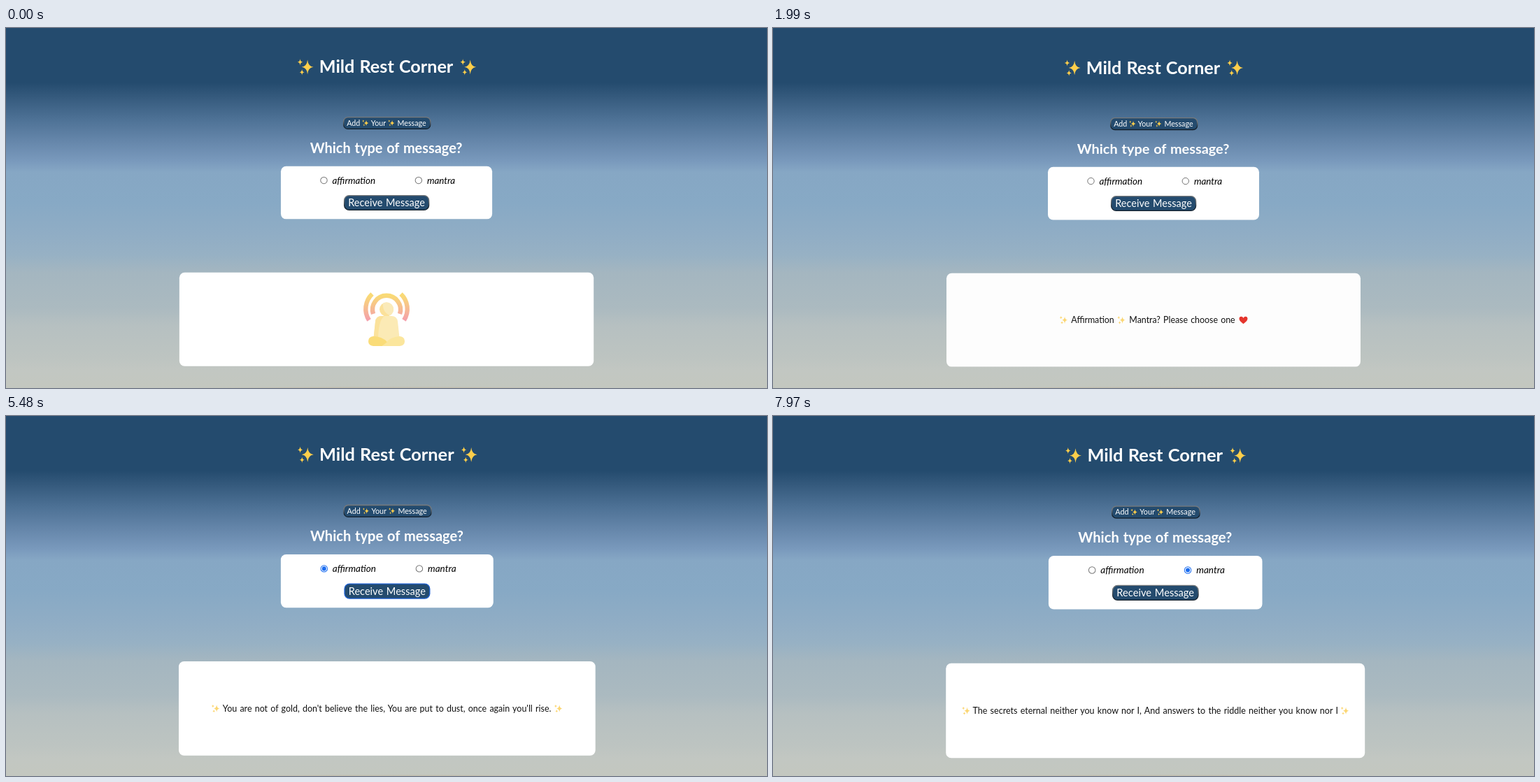
Animation of 1088 by 515 pixels, one loop 8000 ms. Source, as an HTML page:

```html
<!DOCTYPE html>
<html lang="en">
<head>
<meta charset="utf-8">
<title>Message picker</title>
<style>
  html, body { margin: 0; height: 100%; overflow: hidden; }
  svg { display: block; width: 100vw; height: 100vh; }
  text { font-family: Lato, "Open Sans", sans-serif; text-anchor: middle; word-spacing: 1px; }
  .light { fill: #fff; }
  .title { font-size: 25.2px; font-weight: 700; }
  .ask { font-size: 19.9px; font-weight: 700; }
  .small { font-size: 10.7px; }
  .send { font-size: 14.5px; }
  .label { font-size: 13.4px; font-style: italic; }
  .message { font-size: 12.4px; fill: #111; }
  .button { fill: #244b6e; stroke-width: 1.3; }
</style>
</head>
<body>
<svg viewBox="0 0 1088 515" preserveAspectRatio="none">
  <defs>
    <linearGradient id="sky" gradientUnits="userSpaceOnUse" x1="0" y1="0" x2="0" y2="515"></linearGradient>
    <linearGradient id="edge" x1="0" y1="0" x2="0" y2="1">
      <stop offset=".3" stop-color="#77797a"/>
      <stop offset=".8" stop-color="#14202b"/>
    </linearGradient>
    <linearGradient id="aura" gradientUnits="userSpaceOnUse" x1="0" y1="380" x2="0" y2="421">
      <stop offset=".1" stop-color="#f9da76"/>
      <stop offset=".95" stop-color="#f49fab"/>
    </linearGradient>
    <radialGradient id="hint">
      <stop offset=".6" stop-color="#bda98c" stop-opacity=".35"/>
      <stop offset="1" stop-color="#bda98c" stop-opacity="0"/>
    </radialGradient>
    <path id="star" d="M0-1Q.1-.1 1 0Q.1.1 0 1Q-.1.1-1 0Q-.1-.1 0-1Z"/>
    <g id="sparkles">
      <use href="#star" transform="translate(.13 0) scale(.35 .43)"/>
      <use href="#star" transform="translate(-.31 -.29) scale(.16 .19)"/>
      <use href="#star" transform="translate(-.2 .31) scale(.15 .18)"/>
    </g>
    <path id="heart" fill="#e5352d" d="M0 .45C-.2 .3-.5 .08-.5-.17C-.5-.48-.12-.52 0-.24C.12-.52 .5-.48 .5-.17C.5 .08 .2 .3 0 .45Z"/>
  </defs>

  <rect width="1088" height="515" fill="url(#sky)"/>
  <ellipse cx="552" cy="516" rx="325" ry="3" fill="url(#hint)"/>

  <g id="page">
    <g fill="#fdce4b">
      <use href="#sparkles" transform="translate(428 57) scale(24)"/>
      <use href="#sparkles" transform="translate(660.5 57) scale(24)"/>
    </g>
    <text class="light title" x="543.5" y="65.5">Mild Rest Corner</text>

    <rect class="button" x="482.7" y="128.7" width="124" height="16.8" rx="6" stroke="url(#edge)"/>
    <g class="light small">
      <text x="496.7" y="140.7">Add</text>
      <text x="532.5" y="140.7">Your</text>
      <text x="580" y="140.7">Message</text>
    </g>
    <g fill="#fdce4b">
      <use href="#sparkles" transform="translate(513.8 137) scale(9.6)"/>
      <use href="#sparkles" transform="translate(550.8 137) scale(9.6)"/>
    </g>

    <text class="light ask" x="543.6" y="179.7">Which type of message?</text>

    <rect x="393" y="198.8" width="302" height="75.6" rx="7.5" fill="#fff"/>
    <g id="radios" fill="#fff"></g>
    <text class="label" x="497.3" y="223.8">affirmation</text>
    <text class="label" x="622" y="223.8">mantra</text>
    <rect id="send" class="button" x="483.6" y="240.6" width="121" height="20.8" rx="7"/>
    <text class="light send" x="544" y="256.2">Receive Message</text>

    <rect id="card" x="248" y="350.8" width="592" height="133.8" rx="7.5"/>
    <g id="content" fill="#fbd673"></g>
  </g>
</svg>
<script>
const $ = id => document.getElementById(id);

const sky = [
  [0, '#244b6e'], [78, '#244b6e'], [100, '#365b7e'], [130, '#4d7195'],
  [160, '#6485a9'], [190, '#7999bc'], [206, '#86a7c4'], [250, '#87a9c5'],
  [295, '#90adc5'], [325, '#97b1c4'], [350, '#a4b6c0'], [400, '#abbac0'],
  [425, '#b6c0c1'], [472, '#bdc4c1'], [490, '#c2c7c2'], [515, '#c3c7bf']
];
$('sky').innerHTML = sky.map(([y, color]) =>
  `<stop offset="${y / 515}" stop-color="${color}"/>`).join('');

const icon = (name, x, size = 12) =>
  `<use href="#${name}" transform="translate(${x} 417.8) scale(${size})"/>`;
const words = (x, text) => `<text class="message" x="${x}" y="422">${text}</text>`;
const quote = (x, reach, text) =>
  icon('sparkles', x - reach) + words(x, text) + icon('sparkles', x + reach);

const meditation = `
  <g fill="none" stroke="url(#aura)" stroke-width="6.4">
    <path d="M525 410A20 20 0 1 1 563 410"/>
    <path d="M523.5 381.5A29.6 29.6 0 0 0 519 419"/>
    <path d="M564.5 381.5A29.6 29.6 0 0 1 569 419"/>
  </g>
  <circle cx="544" cy="403.5" r="10" fill="#fbe19a"/>
  <path d="M539 394.8A10 10 0 1 1 549 412.2Q538 408 539 394.8Z" fill="#faeab9"/>
  <path d="M537 413H551Q559 413 560 421L563 449H525L528 421Q529 413 537 413Z" fill="#fbeab5"/>
  <path d="M537 413H541Q532 419 532 449H525L528 421Q529 413 537 413Z" fill="#fbe29b"/>
  <path d="M563 442Q551 443 545 449L538 456H563Q570 455 570 449Q570 443 563 442Z" fill="#fbe69d"/>
  <path d="M525 442Q537 442 545 450L538 456H525Q518 455 518 449Q518 443 525 442Z" fill="#fadc78"/>`;

const choose = icon('sparkles', 415.5) + words(457, 'Affirmation') +
  icon('sparkles', 498) + words(585, 'Mantra? Please choose one') + icon('heart', 672.5);

const scenes = [
  { start: 0, x: -.3, y: -1.2, scale: 1.0006, content: meditation },
  { start: 500, x: 0, y: 0, scale: 1, card: '#fdfdfd', content: choose },
  { start: 2990, x: -2.6, y: -2, scale: 1.0063, picked: 0, focus: true,
    content: quote(543.7, 206.2, 'Before time takes you by surprise, Ask for good red wine and get wise') },
  { start: 5480, x: -2.6, y: -2, scale: 1.0063, picked: 0, focus: true,
    content: quote(543.8, 243.5, "You are not of gold, don't believe the lies, You are put to dust, once again you'll rise.") },
  { start: 7970, x: -3.7, y: -1.1, scale: 1.0118, picked: 1,
    content: quote(544, 267.6, 'The secrets eternal neither you know nor I, And answers to the riddle neither you know nor I') }
];

const radio = (x, on) =>
  `<circle cx="${x}" cy="219" r="4.7" stroke="${on ? '#1a6cf0' : '#767676'}"/>` +
  (on ? `<circle cx="${x}" cy="219" r="3" fill="#1a6cf0"/>` : '');

function show(scene) {
  $('page').setAttribute('transform', `translate(${scene.x} ${scene.y}) scale(${scene.scale})`);
  $('radios').innerHTML = [454.5, 589.8].map((x, i) => radio(x, scene.picked === i)).join('');
  $('send').setAttribute('stroke', scene.focus ? '#1d5fd0' : 'url(#edge)');
  $('card').setAttribute('fill', scene.card || '#fff');
  $('content').innerHTML = scene.content;
}

let current;
function tick() {
  const time = performance.now() % 8000;
  const scene = scenes.findLast(s => s.start <= time);
  if (scene !== current) show(current = scene);
  requestAnimationFrame(tick);
}
tick();
</script>
</body>
</html>
```
